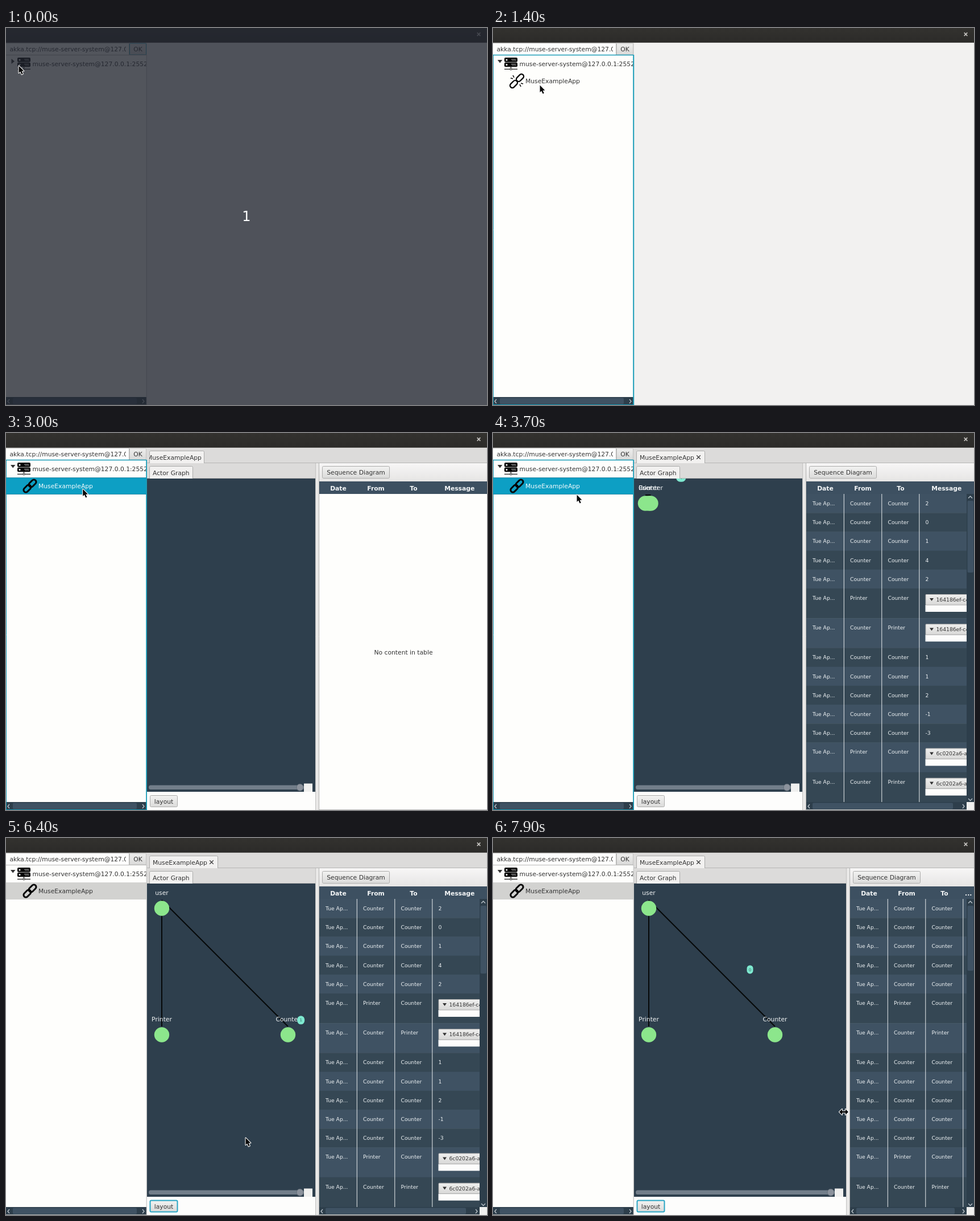
An HTML page with a canvas for the animation above (8000 ms loop, 846x662 px).

```html
<!DOCTYPE html>
<html lang="en">
<head>
<meta charset="utf-8">
<title>Actor monitor</title>
<style>
html, body { margin: 0; width: 846px; height: 662px; overflow: hidden; }
canvas { display: block; }
</style>
</head>
<body>
<canvas id="stage" width="846" height="662"></canvas>
<script>
const g = document.getElementById('stage').getContext('2d');
const LOOP = 8000, STEP = 100, TRIP = 330;
const INK = '#333', CYAN = '#1c9db8', DARK = '#2e3f4d', SLATE = '#3f5263', PALE = '#f2f1f0';

// [time, x, y]
const POINTER = [
  [0, 22, 66], [99, 22, 66], [100, 18, 63], [300, 17, 63], [900, 17, 63], [1000, 16, 63],
  [1100, 16, 63], [1200, 32, 72], [1300, 62, 90], [1400, 82, 100], [1800, 82, 100],
  [1900, 90, 101], [2300, 134, 98], [3400, 135, 98], [3700, 147, 108], [4300, 242, 240],
  [4800, 302, 590], [5100, 278, 641], [6000, 278, 641], [6400, 421, 526], [6700, 547, 485],
  [7300, 549, 485], [7600, 562, 484], [7900, 617, 481]
];
const SPLIT = [[7300, 0], [7600, 12.5], [7900, 77]];
const THUMB = [[3300, 247], [3700, 245], [6400, 238], [7600, 233]];

// [start, value, pill width]
const LOOPS = [[3643, '4', 17], [3990, '2', 14], [5010, '1', 13], [5420, '2', 13],
  [6366, '1', 13], [6880, '2', 12], [7643, '0', 11]];
// [start, value, heads to Counter]
const CARDS = [[4390, '?', true], [4465, '4', false], [7307, '?', true], [7388, '-37', false]];

const ROWS = ['2', '0', '1', '4', '2', '>164186ef-c4d1', '<164186ef-c4d1',
  '1', '1', '2', '-1', '-3', '>6c0202a6-a71e', '<6c0202a6-a71e'];

function track(keys, t) {
  const i = keys.findIndex(k => k[0] > t);
  if (i === 0) return keys[0].slice(1);
  if (i < 0) return keys[keys.length - 1].slice(1);
  const a = keys[i - 1], b = keys[i], p = (t - a[0]) / (b[0] - a[0]);
  return a.slice(1).map((v, n) => v + (b[n + 1] - v) * p);
}
function ease(s) {
  if (s < .2) return 3.125 * s * s;
  if (s > .8) return -3.125 * s * s + 6.25 * s - 2.125;
  return 1.25 * s - .125;
}

function box(x, y, w, h, fill) {
  g.fillStyle = fill;
  g.fillRect(x, y, w, h);
}
function round(x, y, w, h, r, fill, stroke, lw = 1) {
  g.beginPath();
  g.roundRect(x, y, w, h, r);
  if (fill) { g.fillStyle = fill; g.fill(); }
  if (stroke) { g.strokeStyle = stroke; g.lineWidth = lw; g.stroke(); }
}
function disc(x, y, r, fill) {
  round(x - r, y - r, 2 * r, 2 * r, r, fill);
}
function text(s, x, y, color = INK, size = 10.75, align = 'left', weight = '') {
  g.font = `${weight} ${size}px "DejaVu Sans", sans-serif`;
  g.textAlign = align;
  g.fillStyle = color;
  g.fillText(s, x, y);
}
function line(color, lw, ...p) {
  g.beginPath();
  for (let i = 0; i < p.length; i += 2) g.lineTo(p[i], p[i + 1]);
  g.strokeStyle = color;
  g.lineWidth = lw;
  g.stroke();
}
function poly(fill, ...p) {
  g.beginPath();
  for (let i = 0; i < p.length; i += 2) g.lineTo(p[i], p[i + 1]);
  g.closePath();
  g.fillStyle = fill;
  g.fill();
}
function shade(y, h, top, bottom) {
  const f = g.createLinearGradient(0, y, 0, y + h);
  f.addColorStop(0, top);
  f.addColorStop(1, bottom);
  return f;
}
function clipped(x, y, w, h, draw) {
  g.save();
  g.beginPath();
  g.rect(x, y, w, h);
  g.clip();
  draw();
  g.restore();
}
function cross(x, y, r, color, lw) {
  line(color, lw, x - r, y - r, x + r, y + r);
  line(color, lw, x - r, y + r, x + r, y - r);
}
function button(label, x, y, w, h, focus) {
  round(x + .5, y + .5, w - 1, h - 1, 2, shade(y, h, '#f3f3f2', '#dadad9'),
    focus ? '#2aa5c4' : '#acacab', focus ? 2 : 1);
  text(label, x + w / 2, y + h / 2 + 4, INK, 10.75, 'center');
}
function tab(label, x, y, w, h, tx) {
  round(x + .5, y + .5, w - 1, h + 3, 2, PALE, '#ababaa');
  clipped(x, y, w, h, () => text(label, tx, y + 15.5));
}
function hScroll(x0, x1, t0, t1) {
  box(x0, 648, x1 - x0, 13, '#2d3e4b');
  round(t0, 649.5, t1 - t0, 11, 2, SLATE);
  line('#bcc5cc', 1.3, x0 + 6, 652, x0 + 3, 655.5, x0 + 6, 659);
  line('#bcc5cc', 1.3, x1 - 7, 652, x1 - 4, 655.5, x1 - 7, 659);
}

function serverIcon() {
  for (const y of [52, 60.5]) {
    round(20, y, 23, 7.8, 2, '#050505');
    disc(24, y + 4, 1.6, '#eee');
    line('#aaa', 1, 32, y + 3, 40, y + 3);
    line('#777', 1, 33, y + 5, 41, y + 5);
  }
  line('#111', 1.2, 31.5, 68, 31.5, 71);
  line('#111', 1.2, 20, 72.3, 43, 72.3);
  round(30, 70.8, 3, 3, 1.5, '#fff', '#111', 1);
}
function linkIcon(joined) {
  g.save();
  g.translate(42, 93);
  g.rotate(-Math.PI / 4);
  const gap = joined ? 0 : 1.3;
  for (const side of [-1, 1]) {
    round(side < 0 ? -14 - gap : -1 + gap, -4, 15, 8, 4, null, '#050505', joined ? 3 : 2.3);
  }
  g.restore();
  if (joined) return;
  for (const d of [-1, 1]) {
    line('#050505', 1.5, 42 + 5 * d, 93 + 6 * d, 42 + 7 * d, 93 + 10 * d);
    line('#050505', 1.5, 42 + 7 * d, 93 + 4 * d, 42 + 11 * d, 93 + 5 * d);
  }
}

function sidebar(t) {
  const open = t >= 600, picked = t >= 2300, focus = t >= 600 && t < 5700;
  box(0, 26, 248, 22, '#dddcdb');
  box(0, 27, 216, 20, '#fefefd');
  line('#b5b5b4', 1, 0, 26.5, 216.5, 26.5, 216.5, 47);
  clipped(0, 26, 211, 22, () => text('akka.tcp://muse-server-system@127.0.0.1:2552', 6.5, 40.5));
  round(217.5, 27, 29, 20, 1, shade(27, 20, '#eeeeed', '#d9d9d8'), t < 600 ? '#2aa5c4' : '#c0c0bf');
  text('OK', 232, 40.5, INK, 10.75, 'center');

  box(0, 47, 248, 615, '#fefefc');
  if (open) poly('#333', 8, 56, 16.5, 56, 12.2, 61.5);
  else poly('#333', 9.5, 54, 15, 58.5, 9.5, 63);
  serverIcon();
  clipped(0, 48, 247, 30, () => text('muse-server-system@127.0.0.1:2552', 46.5, 67));
  if (open) {
    if (picked) {
      box(0, 78, 247, 30, focus ? '#0d9fc4' : '#d2d2d0');
      if (focus) round(.5, 78.5, 246, 29, 0, null, '#2d8ca6');
    }
    linkIcon(t >= 3000);
    text('MuseExampleApp', 57, 97, picked && focus ? '#f4fbfd' : INK);
  }
  hScroll(0, 247, 12, 230);
  const edge = focus ? CYAN : '#b9b9b8';
  line(edge, focus ? 1.5 : 1, 0, 47.5, 247, 47.5);
  line(edge, focus ? 2 : 1, 247.2, 47, 247.2, 662);
  line(edge, 1, 0, 661.5, 247, 661.5);
  if (focus) line(edge, 1, .5, 47, .5, 662);
}

function card(cx, cy, value) {
  const x = cx - 130, y = cy - 17.5;
  round(x + .5, y + .5, 259, 34, 1, '#f1f1f0', '#a4a4a3');
  round(x + .5, y + .5, 259, 20, 1, shade(y, 20, '#f1f1f0', '#d9d9d8'), '#a4a4a3');
  poly(INK, x + 7, y + 8, x + 14, y + 8, x + 10.5, y + 13);
  text('b81d40e7-5a8c-49e2-888e-29e9b2c3c7f0', cx + 121, y + 14.5, INK, 10.75, 'right');
  text(value, cx, y + 31.5, INK, 10.75, 'center');
}
function loopPoint(u) {
  const a = 3 * u * (1 - u);
  return [a * ((1 - u) * 250 - u * 179), -a * ((1 - u) * 100 + u * 285)];
}

function graph(t, right) {
  const spread = t >= 5900;
  const user = [spread ? 274 : 268, 109];
  const printer = [274, spread ? 331 : 109];
  const counter = [spread ? 496 : 277.5, printer[1]];
  clipped(248, 80, right - 248, 550, () => {
    box(248, 80, right - 248, 550, DARK);
    if (t >= 3300) {
      line('#050808', 2, ...user, ...printer);
      line('#050808', 2, ...user, ...counter);
    }
    if (t >= 3100) {
      [['user', user], ['Printer', printer], ['Counter', counter]].forEach(([name, [x, y]]) => {
        disc(x, y + 14.5, 13.2, '#8ce68c');
        text(name, x, y - 9, '#f0f3f4', 10.75, 'center');
      });
    }
    for (const [start, value, w] of LOOPS) {
      const s = (t - start) / TRIP;
      if (s < 0 || s >= 1) continue;
      const [dx, dy] = loopPoint(ease(s)), x = counter[0] + dx, y = counter[1] - 1 + dy;
      round(x - w / 2, y - 7.5, w, 15, Math.min(w / 2, 7), '#7ee9d0');
      text(value, x, y + 2.7, '#31675f', 7, 'center');
    }
    for (const [start, value, out] of CARDS) {
      const s = (t - start) / TRIP;
      if (s < 0 || s >= 1) continue;
      const u = out ? ease(s) : 1 - ease(s);
      card(printer[0] - 46 + (counter[0] - printer[0]) * u, printer[1] - 27.5, value);
    }
    round(251, 618.5, right - 271, 7.5, 3.5, '#727e8a');
    round(right - 33, 616.3, 12, 12, 6, '#8b929c', '#626d78');
    box(right - 20, 615.5, 15, 14.5, '#f0f0ef');
  });
  box(248, 630, right - 248, 32, '#fdfdfc');
  button('layout', 253, 636, 49, 21, t >= 5700);
}

function table(t, left) {
  const filled = t >= 3300, cols = [0, 66, 132.5, 198.5];
  box(left, 53, 846 - left, 32, shade(53, 32, '#f7f6f6', '#e6e5e4'));
  button('Sequence Diagram', left + 5, 58, 119, 22, false);
  box(left, 85, 846 - left, 22, '#3d5061');
  ['Date', 'From', 'To'].forEach((h, i) =>
    text(h, left + cols[i] + 33.5, 100.7, '#f6f8f9', 10.75, 'center', 'bold'));
  const last = left + cols[3];
  text(846 - last > 60 ? 'Message' : '...', Math.min((last + 846) / 2, 837), 100.7,
    '#f6f8f9', 10.75, 'center', 'bold');
  if (!filled) {
    box(left, 107, 846 - left, 555, '#fefefc');
    text('No content in table', left + 148, 388.7, INK, 10.75, 'center');
    line('#b9b9b8', 1, left, 661.5, 846, 661.5);
    return;
  }
  clipped(left, 107, 833 - left, 541, () => {
    let y = 107;
    ROWS.forEach((row, i) => {
      const paired = /[<>]/.test(row[0]), h = paired ? 52.2 : 33.2;
      const from = row[0] === '>' ? 'Printer' : 'Counter';
      const to = row[0] === '<' ? 'Printer' : 'Counter';
      box(left, y, 846 - left, h + .5, i % 2 ? '#354754' : SLATE);
      ['Tue Ap...', from, to].forEach((s, c) => text(s, left + cols[c] + 11, y + 20, '#eef2f4', 9.2));
      const x = last + 11;
      if (paired) {
        box(x, y + 29, 100, 12, '#fdfdfc');
        round(x + .5, y + 10.5, 100, 18.5, 1, shade(y + 10, 19, '#f0f0ef', '#d8d8d7'), '#aaa');
        poly(INK, x + 7.5, y + 17, x + 14.5, y + 17, x + 11, y + 22);
        text(row.slice(1), x + 19, y + 23, INK, 9.2);
      } else text(row, x, y + 20, '#eef2f4', 9.2);
      y += h;
    });
    for (const c of cols.slice(1)) line('#e9edef', 1, left + c + .3, 107, left + c + .3, 648);
  });
  box(833, 107, 13, 541, '#2d3e4b');
  const [end] = track(THUMB, t);
  round(834.5, 119, 10.5, end - 119, 2, SLATE);
  line('#bcc5cc', 1.3, 836, 114.5, 839.5, 111, 843, 114.5);
  line('#bcc5cc', 1.3, 836, 642, 839.5, 645.5, 843, 642);
  hScroll(left, 833, left + 11, left > 600 ? 812 : 809);
  box(833, 648, 13, 14, '#f0f0ef');
  line('#d0d0cf', 1, left, 661.5, 833, 661.5);
}

function workspace(t) {
  const right = 544 + track(SPLIT, t)[0];
  box(248, 26, 598, 27, '#dcdbda');
  line('#b5b5b4', 1, 248, 52.5, 846, 52.5);
  const opening = t < 3100;
  tab('MuseExampleApp', 252, 31, opening ? 97 : 121, 22, opening ? 248 : 258);
  if (!opening) cross(361.5, 42.5, 3.3, '#444', 1.4);
  box(248, 53, right - 248, 27, '#dcdbda');
  line('#b5b5b4', 1, 248, 79.5, right, 79.5);
  tab('Actor Graph', 252, 58, 77, 22, 258);
  graph(t, right);
  box(right, 53, 7, 609, '#e9e8e7');
  line('#c3c3c2', 1, right + .5, 53, right + .5, 662);
  line('#b1b1b0', 1, right + 6.5, 53, right + 6.5, 662);
  table(t, right + 7);
}

function pointer(t) {
  const [x, y] = track(POINTER, t);
  g.save();
  g.translate(x, y);
  g.beginPath();
  const shape = t >= 6700
    ? [-8, 0, -3, -5, -3, -1.5, 3, -1.5, 3, -5, 8, 0, 3, 5, 3, 1.5, -3, 1.5, -3, 5]
    : [.5, .5, .5, 13, 3.3, 10.5, 5.6, 15.5, 7.8, 14.5, 5.6, 9.7, 9.4, 9.4];
  for (let i = 0; i < shape.length; i += 2) g.lineTo(shape[i], shape[i + 1]);
  g.closePath();
  g.lineJoin = 'round';
  g.strokeStyle = '#fff';
  g.lineWidth = 2;
  g.stroke();
  g.fillStyle = '#0a0a0a';
  g.fill();
  g.restore();
}

function draw(t) {
  box(0, 0, 846, 662, PALE);
  box(0, 0, 846, 25, shade(0, 25, '#33322f', '#2c2b29'));
  line('#5a5957', 1, 0, 25.5, 846, 25.5);
  cross(831.5, 11, 2.8, '#c5c3bf', 1.7);
  sidebar(t);
  if (t >= 3000) workspace(t);
  if (t < 100) {
    box(0, 0, 846, 662, 'rgba(34,38,48,.78)');
    text('1', 423, 339, '#fff', 24, 'center');
  }
  pointer(t);
}

const began = performance.now();
function tick(now) {
  const t = Math.max(0, now - began) % LOOP;
  draw(Math.floor(t / STEP) * STEP);
  requestAnimationFrame(tick);
}
draw(0);
requestAnimationFrame(tick);
</script>
</body>
</html>
```
